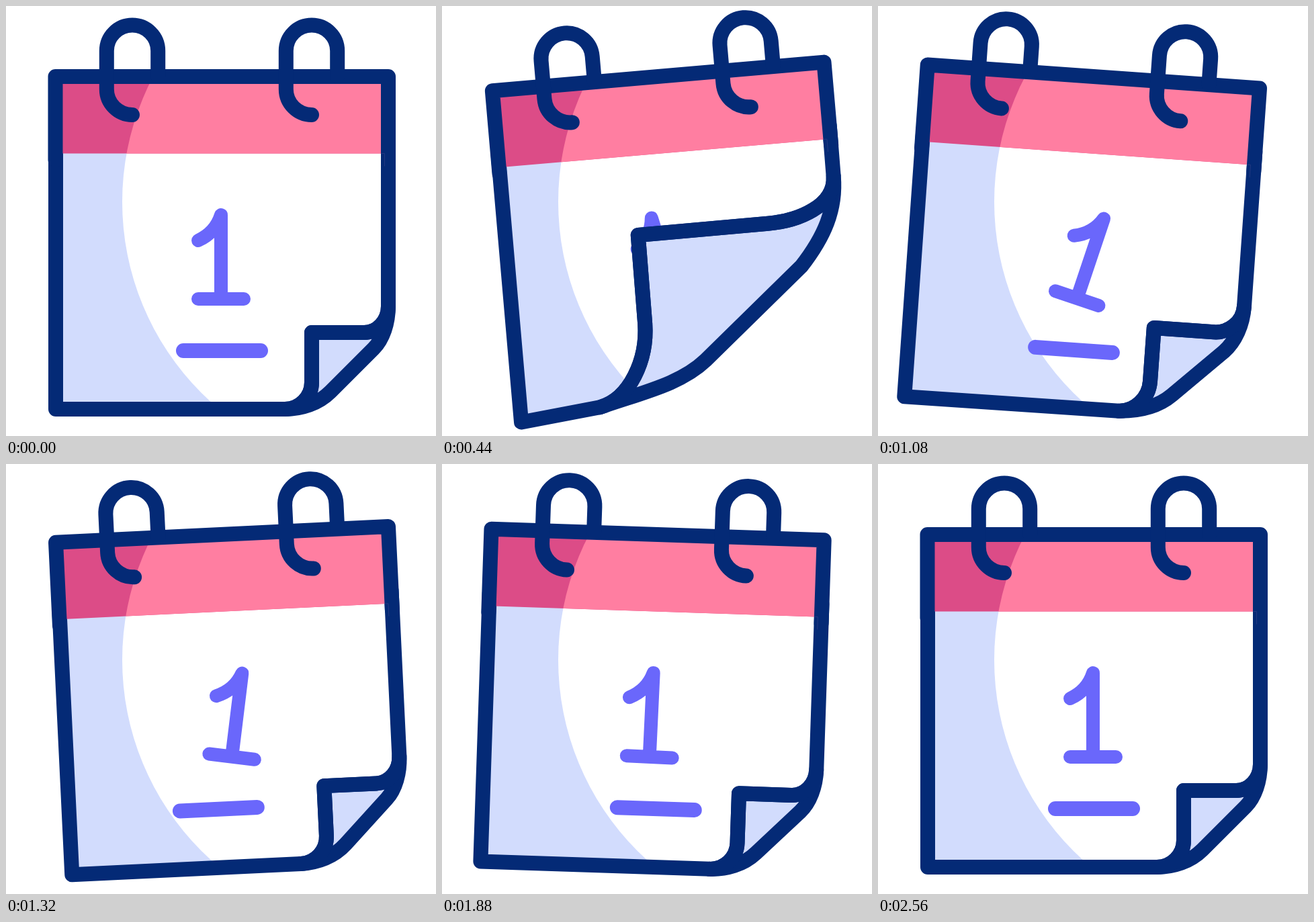
Write an HTML page with a canvas that moves like this. It is 640x640 px and loops after 3200 ms.

```html
<!DOCTYPE html>
<html lang="en">
<head>
<meta charset="utf-8">
<title>Swinging calendar</title>
<style>
  html, body { margin: 0; height: 100%; overflow: hidden; background: #fff; }
  canvas { display: block; width: 640px; height: 640px; }
</style>
</head>
<body>
<canvas id="stage" width="640" height="640"></canvas>
<script>
const ctx = document.getElementById('stage').getContext('2d');

const LOOP = 3200, STEP = 40, LINE = 22;
const NAVY = '#042a76', PINK = '#ff7ea1', ROSE = '#dc4c87';
const MIST = '#d2dcfd', VIOLET = '#6a67fb', WHITE = '#fff';
const PIVOT = [321, 100];
const DIGIT_BASE = [320, 436];

// Each track is a list of [time, value] keys, eased in and out.
const SWING = [[0, 0], [600, -6], [960, 6], [1360, -3], [1760, 3], [2160, -2], [2560, 0]];
const TILT = [[0, 0], [600, -15], [1120, 15], [1600, 1], [2560, 0]];
const CURL = [[0, 0], [570, 1.152], [1190, 0]];
const SLIDE = [[1040, 0], [1520, -40], [2000, 20], [2480, 0]];

// Corner outline: [x, y] at rest, then [x, y] when curled.
const FOLD = {
  bottom: [415, 600, 192, 588],
  bottomIn: [437, 600, 238, 580],
  sideIn: [455, 582, 269, 523],
  side: [455, 560, 270, 470],
  tip: [455, 486, 271, 337.5],
  top: [533, 486, 465, 337],
  topIn: [553, 486, 510, 337],
  rightIn: [569, 468, 568, 320],
  right: [569, 447, 568.5, 275],
  rightOut: [569, 472, 568.5, 325],
  upperOut: [561, 496, 547, 364],
  upper: [547, 510, 509, 405],
  lower: [483, 574, 355, 532],
  lowerOut: [465, 592, 315, 564],
  bottomOut: [440, 600, 259, 571],
};

function valueAt(track, t) {
  if (t <= track[0][0]) return track[0][1];
  for (let i = 1; i < track.length; i++) {
    const [t0, v0] = track[i - 1], [t1, v1] = track[i];
    if (t < t1) {
      const p = (t - t0) / (t1 - t0);
      return v0 + (v1 - v0) * p * p * (3 - 2 * p);
    }
  }
  return track[track.length - 1][1];
}

function foldPoints(curl) {
  const points = {};
  for (const name in FOLD) {
    const [x0, y0, x1, y1] = FOLD[name];
    points[name] = [x0 + (x1 - x0) * curl, y0 + (y1 - y0) * curl];
  }
  return points;
}

function rotateAbout([x, y], degrees) {
  ctx.translate(x, y);
  ctx.rotate(degrees * Math.PI / 180);
  ctx.translate(-x, -y);
}

function stroke(path, color, width) {
  ctx.strokeStyle = color;
  ctx.lineWidth = width;
  ctx.stroke(path);
}

function foldEdge(path, f) {
  path.bezierCurveTo(...f.bottomIn, ...f.sideIn, ...f.side);
  path.lineTo(...f.tip);
  path.lineTo(...f.top);
  path.bezierCurveTo(...f.topIn, ...f.rightIn, ...f.right);
}

function pagePath(f) {
  const path = new Path2D();
  path.moveTo(569, 200);
  path.lineTo(74, 200);
  path.lineTo(74, 600);
  path.lineTo(...f.bottom);
  foldEdge(path, f);
  path.closePath();
  return path;
}

function flapPath(f) {
  const path = new Path2D();
  path.moveTo(...f.bottom);
  foldEdge(path, f);
  path.bezierCurveTo(...f.rightOut, ...f.upperOut, ...f.upper);
  path.lineTo(...f.lower);
  path.bezierCurveTo(...f.lowerOut, ...f.bottomOut, ...f.bottom);
  path.closePath();
  return path;
}

// The edge of the shade stays still while the calendar swings.
function fillShaded(path, shade, light) {
  ctx.save();
  ctx.fillStyle = shade;
  ctx.fill(path);
  ctx.clip(path);
  ctx.setTransform(1, 0, 0, 1, 0, 0);
  ctx.beginPath();
  ctx.arc(575, 291.5, 402, 0, Math.PI * 2);
  ctx.fillStyle = light;
  ctx.fill();
  ctx.restore();
}

function drawDate(t) {
  const slide = valueAt(SLIDE, t);
  stroke(new Path2D(`M${264 + slide} 513H${379 + slide}`), VIOLET, LINE);
  ctx.save();
  rotateAbout(DIGIT_BASE, valueAt(TILT, t));
  stroke(new Path2D('M286 349Q312 337 320 311V436M286 436H354'), VIOLET, 20);
  ctx.restore();
}

function drawHeader() {
  const band = new Path2D();
  band.rect(74, 105, 495, 114.5);
  fillShaded(band, ROSE, PINK);
  stroke(new Path2D('M73.5 229V105H569V229'), NAVY, LINE);
  stroke(new Path2D('M559 219.5H563.5V238'), '#2a3c84', 0.8);
}

function drawRing(x) {
  const ring = new Path2D();
  ring.moveTo(x + 38.2, 104);
  ring.lineTo(x + 38.2, 66.8);
  ring.arc(x, 66.8, 38.2, 0, Math.PI, true);
  ring.lineTo(x - 38.2, 123.8);
  ring.arc(x, 123.8, 38.2, Math.PI, Math.PI / 2, true);
  stroke(ring, NAVY, LINE);
}

function draw(t) {
  const fold = foldPoints(valueAt(CURL, t));
  const page = pagePath(fold), flap = flapPath(fold);

  ctx.setTransform(1, 0, 0, 1, 0, 0);
  ctx.fillStyle = WHITE;
  ctx.fillRect(0, 0, 640, 640);
  ctx.lineCap = ctx.lineJoin = 'round';
  rotateAbout(PIVOT, valueAt(SWING, t));

  fillShaded(page, MIST, WHITE);
  ctx.save();
  ctx.clip(page);
  drawDate(t);
  ctx.restore();

  ctx.fillStyle = MIST;
  ctx.fill(flap);
  stroke(flap, NAVY, LINE);
  stroke(page, NAVY, LINE);

  drawHeader();
  drawRing(188);
  drawRing(455);
}

function tick() {
  const t = performance.now() % LOOP;
  draw(Math.floor(t / STEP) * STEP);
  requestAnimationFrame(tick);
}
tick();
</script>
</body>
</html>
```
